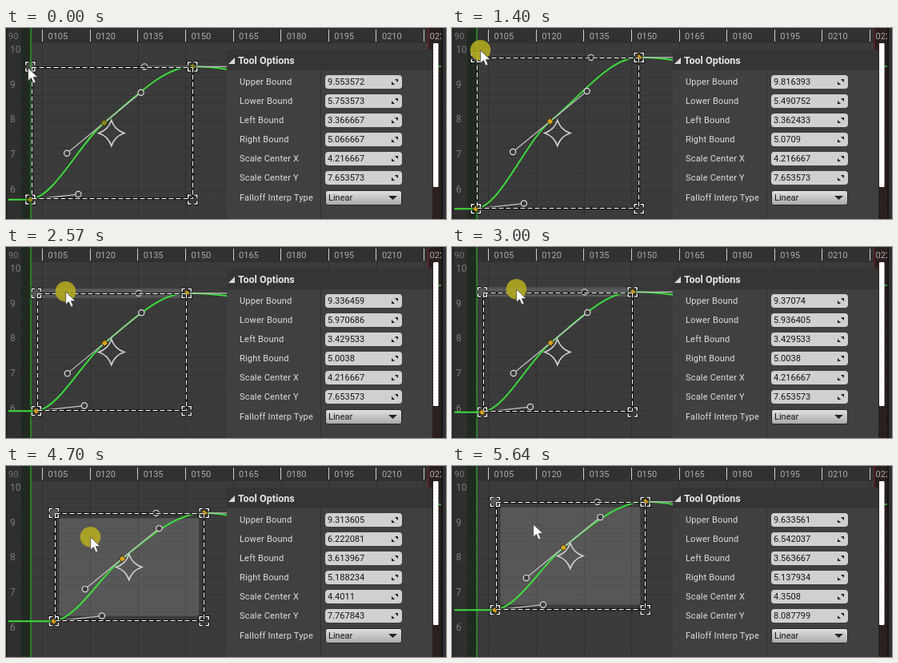
An HTML page for the animation above (6300 ms loop, 550 px wide and 239 px high).

```html
<!DOCTYPE html>
<html lang="en">
<head>
<meta charset="utf-8">
<title>Curve transform tool</title>
<style>
html, body { margin: 0; width: 100%; height: 100%; overflow: hidden; background: #3b3b3b; }
svg { display: block; width: 550px; height: 239px; }
text { font: 11px Roboto, "Noto Sans", sans-serif; }
</style>
</head>
<body>
<svg id="stage" viewBox="0 0 550 239"></svg>
<script>
const LOOP = 6300;
const UNIT_X = 119.284, UNIT_Y = 43.756;                // pixels per unit
const HOME = { x: 4.2166667, y: 7.65357285, w: .85, h: 1.89999945 };
const stage = document.getElementById('stage');

// Time and value to pixels
const px = t => 131.8 + (t - HOME.x) * UNIT_X;
const py = v => 131.5 - (v - HOME.y) * UNIT_Y;

function add(name, attrs, parent = stage) {
  const el = document.createElementNS('http://www.w3.org/2000/svg', name);
  parent.appendChild(el);
  return set(el, attrs);
}
function set(el, attrs) {
  for (const k in attrs) el.setAttribute(k, attrs[k]);
  return el;
}
const box = (x, y, width, height, fill, more) => add('rect', { x, y, width, height, fill, ...more });
const path = (d, stroke, width = 1, more) =>
  add('path', { d, stroke, 'stroke-width': width, fill: 'none', ...more });
function label(x, y, str, fill, more) {
  const el = add('text', { x, y, fill, ...more });
  el.textContent = str;
  return el;
}
const at = (el, x, y) => el.setAttribute('transform', `translate(${x.toFixed(2)} ${y.toFixed(2)})`);
const show = (el, on) => el.setAttribute('visibility', on ? 'visible' : 'hidden');

// Background grid
box(0, 0, 550, 239, '#3b3b3b');
let rows = '', columns = '';
for (let v = 5; v < 11; v += .25) rows += `M0 ${Math.round(py(v)) + .5}H534`;
for (let t = 3.5; t < 8; t += .5) columns += `M${Math.round(px(t)) - .5} 19V239`;
path(rows, '#343434');
path(columns, '#2f2f2f');
box(0, 0, 550, 19, '#313131');

// Areas outside the playback range
function outside(x, width, fill, stripe) {
  box(x, 0, width, 239, fill);
  let d = '';
  for (let y = -width; y < 239; y += 4) d += `M${x} ${y}l${width} ${width}`;
  path(d, stripe, 1.4);
}
box(0, 0, 20, 239, '#2f2f2f');
outside(19, 12, '#2a332a', '#182018');
outside(528, 22, '#332828', '#211717');
path('M31 0V239', '#2c922c', 1.6);
path('M528 0V239', '#5e2020', 1.6);
box(0, 0, 2, 239, '#242424');

// Rulers
label(3, 14, '90', '#777');
for (let i = 0; i < 9; i++) {
  const x = 46 + i * 59.64;
  path(`M${Math.round(x) - .5} 2V17`, '#cfcfcf');
  label(x + 6.5, 14, String(105 + i * 15).padStart(4, '0'), '#acacac');
}
for (let v = 6; v <= 10; v++) label(5, py(v) + 2, v, '#7d7d7d', { style: 'font-size:12px' });

// Curve and transform box
const hover = box(0, 0, 0, 0, '#fff', { opacity: .14 });
const curve = path('', '#3cdc3c', 2);
const arms = path('', '#c4c4c4', 1.2);
const knobs = [0, 1, 2, 3].map(() =>
  add('circle', { r: 3.6, fill: '#3a3a3a', stroke: '#dedede', 'stroke-width': 1.2 }));
const keys = [0, 1, 2].map(() => path('M0-4.2L4.2 0 0 4.2-4.2 0Z', '#2a2410', 1));
const star = path('M0-16Q4-4 16 0Q4 4 0 16Q-4 4-16 0Q-4-4 0-16Z', '#d2d2d2', 1.6);
const frameBack = path('', '#111', 3, { opacity: .8 });
const frame = path('', '#fff', 1, { 'stroke-dasharray': '6 3' });
const grips = [0, 1, 2, 3].map(i => {
  const g = add('g', {});
  const d = 'M-5.5-2V-5.5H-2M2-5.5H5.5V-2M5.5 2V5.5H2M-2 5.5H-5.5V2';
  if (!i) add('rect', { x: -5, y: -5, width: 10, height: 10, fill: '#fff', opacity: .15 }, g);
  add('path', { d, stroke: '#111', 'stroke-width': 3.2, fill: 'none' }, g);
  add('path', { d, stroke: '#fff', 'stroke-width': 1.4, fill: 'none' }, g);
  return g;
});

// Options panel
box(276, 27, 257, 212, '#404040');
box(276, 27, 257, 26, '#353535');
path('M393.5 53V239', '#303030');
path('M286 37V45H278Z', 'none', 0, { fill: '#d8d8d8' });
label(290, 45, 'Tool Options', '#e6e6e6', { style: 'font-weight:700;font-size:12.5px' });
const names = ['Upper Bound', 'Lower Bound', 'Left Bound', 'Right Bound', 'Scale Center X', 'Scale Center Y'];
const fields = names.map((name, i) => {
  const y = 67 + i * 24;
  label(292, y + 4, name, '#dedede', { 'letter-spacing': .2 });
  box(399, y - 8, 96, 17, '#d0d0d0', { rx: 4 });
  path(`M486 ${y - 3}h4v4zM482 ${y}v4h4z`, 'none', 0, { fill: '#1c1c1c' });
  return label(402, y + 4, '', '#141414');
});
label(292, 216, 'Falloff Interp Type', '#dedede', { 'letter-spacing': .2 });
const shade = add('linearGradient', { id: 'shade', x2: 0, y2: 1 }, add('defs', {}));
add('stop', { offset: 0, 'stop-color': '#e2e2e2' }, shade);
add('stop', { offset: 1, 'stop-color': '#a9a9a9' }, shade);
box(399.5, 203.5, 95, 18, 'url(#shade)', { rx: 2.5, stroke: '#282828' });
label(403, 216, 'Linear', '#141414');
path('M478 210H489L483.5 215Z', 'none', 0, { fill: '#222' });

// Right edge
path('M540 48H544', '#36b436', 1.6);
box(534, 19, 6.5, 180, '#fff', { rx: 1 });
box(544, 0, 2, 239, '#141414');
box(546, 0, 4, 239, '#303030');

const press = add('circle', { r: 12.8, fill: '#b8ae1e', opacity: .85 });
const pointer = path('M0 0V16L3.8 12.6L6.5 19L9.3 17.8L6.6 11.6H12Z', '#333', .7, { fill: '#fff' });

// Where the pointer turns or rests: [ms, x, y]
const turns = [
  [240, 27, 50], [300, 36, 51], [890, 64, 74], [1525, 32, 23], [1960, 52, 72], [2060, 51, 72],
  [2150, 67, 61], [2500, 73, 58], [2750, 77, 46], [3000, 80, 53], [3200, 80, 66], [3350, 80, 50],
  [3580, 80, 57], [3830, 80, 57], [4180, 81, 81], [4460, 83, 94],
  [4700, 105, 89], [4900, 100, 58], [5300, 92, 100], [5550, 99, 75], [5620, 101, 73]
];
// Each drag measures the pointer from its grab point
const drags = [
  { kind: 'corner', from: 300, to: 2060, x: 36, y: 51 },
  { kind: 'top', from: 2500, to: 3020, y: 37 },
  { kind: 'top', from: 3200, to: 4180, y: 50 },
  { kind: 'move', from: 4460, to: 5550, x: 83, y: 94 }
];

function pointerAt(t) {
  const next = turns.findIndex(p => p[0] > t);
  if (next < 1) return turns.at(next).slice(1);
  const [t0, x0, y0] = turns[next - 1], [t1, x1, y1] = turns[next];
  const u = (t - t0) / (t1 - t0), k = u * u * (3 - 2 * u);
  return [Math.round(x0 + (x1 - x0) * k), Math.round(y0 + (y1 - y0) * k)];
}

// Scaling follows the pointer at half speed, moving at full speed
function boundsAt(t) {
  let { x, y, w, h } = HOME;
  for (const drag of drags.filter(d => t >= d.from)) {
    const [mx, my] = pointerAt(Math.min(t, drag.to));
    const dx = (mx - drag.x) / UNIT_X, dy = (my - drag.y) / UNIT_Y;
    if (drag.kind === 'move') {
      x += dx;
      y -= dy;
    } else {
      h = HOME.h - dy / 2;
      // The scaled right bound snaps to four decimals
      if (drag.kind === 'corner') w = +(HOME.x + HOME.w - dx / 2).toFixed(4) - HOME.x;
    }
  }
  return [y + h, y - h, x - w, x + w, x, y];
}

function draw(t) {
  const bounds = boundsAt(t);
  bounds.forEach((v, i) => fields[i].textContent = +v.toFixed(6));

  const [upper, lower, left, right, cx, cy] = bounds;
  const x0 = px(left), x1 = px(right), y0 = py(upper), y1 = py(lower);
  const mx = x0 + (x1 - x0) * .455, my = y1 - (y1 - y0) * .577;
  const a = (mx - x0) / 3, b = (x1 - mx) / 3;
  curve.setAttribute('d', `M3 ${y1}H${x0}` +
    `C${x0 + a} ${y1 - a * .11} ${mx - a} ${my + a * .82} ${mx} ${my}` +
    `C${mx + b} ${my - b * .82} ${x1 - b} ${y0} ${x1} ${y0}` +
    `Q${(x1 + 280) / 2} ${y0} 280 ${y0 + 3.8}`);

  const ends = [[x0 + 60, y1 - 6.6], [mx - 46.5, my + 38], [mx + 46, my - 38], [x1 - 60, y0]];
  ends.forEach((p, i) => at(knobs[i], ...p));
  arms.setAttribute('d', `M${x0} ${y1}L${ends[0]}M${ends[1]}L${ends[2]}M${ends[3]}H${x1 + 60}`);
  [[x0, y1], [mx, my], [x1, y0]].forEach((p, i) => {
    at(keys[i], ...p);
    keys[i].setAttribute('fill', t < 240 ? '#8c8c1e' : '#d9a11c');
  });
  at(star, px(cx), py(cy));

  const [l, r, top, bottom] = [x0 + 1.8, x1, y0 + 1, y1 - .7].map(v => Math.floor(v) + .5);
  const edges = `M${l} ${top}H${r}M${l} ${bottom}H${r}M${l} ${top}V${bottom}M${r} ${top}V${bottom}`;
  frameBack.setAttribute('d', edges);
  frame.setAttribute('d', edges);
  [[x0, y0], [x1, y0], [x0, y1], [x1, y1]].forEach((p, i) => at(grips[i], ...p));

  const inside = t >= 4250;
  show(hover, t >= 2100);
  set(hover, {
    x: x0 + 6.5, width: x1 - x0 - 13,
    y: inside ? y0 + 6.5 : y0 - 6, height: inside ? y1 - y0 - 13 : 12
  });

  const [mouseX, mouseY] = pointerAt(t);
  at(pointer, mouseX + .7, mouseY);
  at(press, mouseX + .5, mouseY - .3);
  show(press, drags.some(d => t >= d.from && t < d.to));
}

const start = performance.now();
function tick() {
  draw((performance.now() - start) % LOOP);
  requestAnimationFrame(tick);
}
tick();
</script>
</body>
</html>
```
